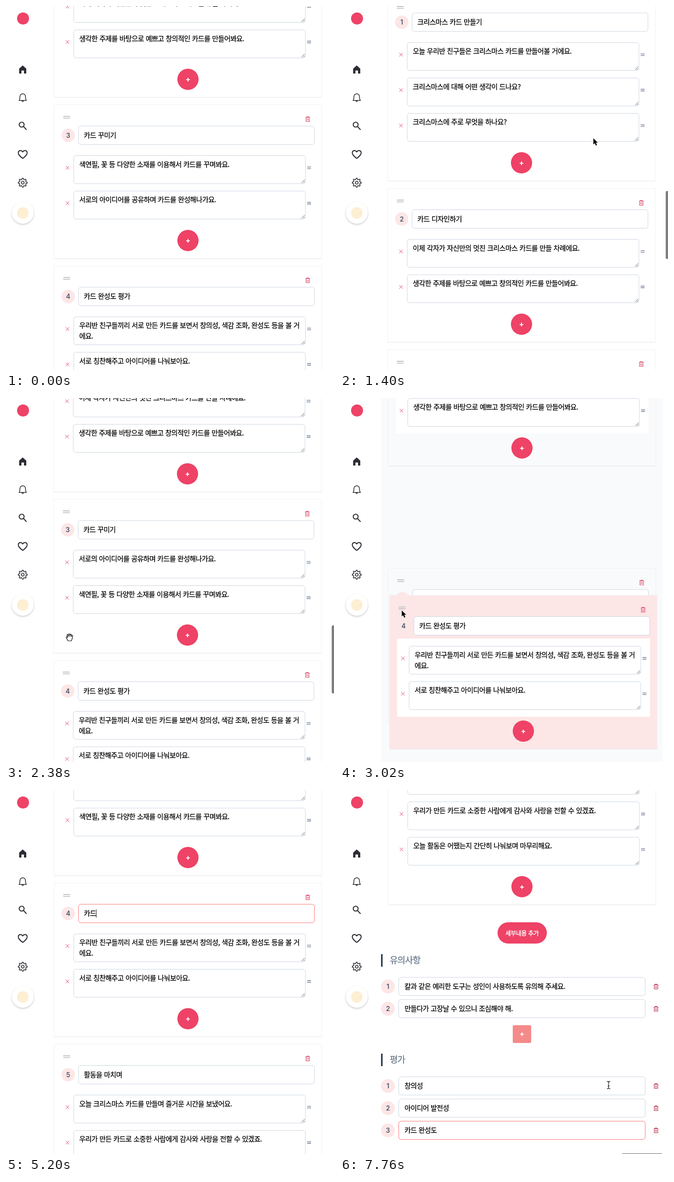
An HTML page for the animation above (7.84 s loop, 712 by 787 pixels).

```html
<!DOCTYPE html>
<html lang="ko">
<head>
<meta charset="utf-8">
<style>
html, body { margin: 0; width: 100%; height: 100%; overflow: hidden; background: #fff; }
svg { display: block; }
text { font: 400 15px "Noto Sans CJK KR", "Noto Sans CJK", sans-serif; letter-spacing: -.6px; word-spacing: .45px; color: #000; fill: currentColor; stroke: currentColor; stroke-width: .25px; white-space: pre; }
.num { font: 600 14px Inter, sans-serif; letter-spacing: 0; color: #475569; stroke: none; text-anchor: middle; }
.heading { font-size: 19px; letter-spacing: -.9px; color: #64748b; }
.add { font-size: 13px; letter-spacing: -.5px; color: #fff; stroke-width: .45px; }
.field { fill: #fff; stroke: #cbd5e1; }
.focus { stroke: #f87171; }
.icon { fill: none; stroke: #2b2d33; stroke-width: 1.6; stroke-linecap: round; stroke-linejoin: round; }
.bold { stroke-width: 2.1; }
</style>
</head>
<body>
<svg id="stage" width="712" height="787" viewBox="0 0 712 787"></svg>
<script>
const LOOP = 7840;
const STRIDE = 348.5;      // distance between two-item cards
const ITEM = 76.6;         // distance between items in a card
const START = 213;         // where the third card begins
const RED = '#ee4266', PINK = '#fde6e6';
const EVAL_TEXT = '카드 완성도', CARD_TEXT = '카드 완성도 평가';

const cards = [
  { title: '크리스마스 카드 만들기', items: [
    ['오늘 우리반 친구들은 크리스마스 카드를 만들어볼 거에요.'],
    ['크리스마스에 대해 어떤 생각이 드나요?'],
    ['크리스마스에 주로 무엇을 하나요?']] },
  { title: '카드 디자인하기', items: [
    ['이제 각자가 자신만의 멋진 크리스마스 카드를 만들 차례에요.'],
    ['생각한 주제를 바탕으로 예쁘고 창의적인 카드를 만들어봐요.']] },
  { title: '카드 꾸미기', items: [
    ['색연필, 꽃 등 다양한 소재를 이용해서 카드를 꾸며봐요.'],
    ['서로의 아이디어를 공유하며 카드를 완성해나가요.']] },
  { title: CARD_TEXT, items: [
    ['우리반 친구들끼리 서로 만든 카드를 보면서 창의성, 색감 조화, 완성도 등을 볼 거', '에요.'],
    ['서로 칭찬해주고 아이디어를 나눠보아요.']] },
  { title: '활동을 마치며', items: [
    ['오늘 크리스마스 카드를 만들며 즐거운 시간을 보냈어요.'],
    ['우리가 만든 카드로 소중한 사람에게 감사와 사랑을 전할 수 있겠죠.'],
    ['오늘 활동은 어땠는지 간단히 나눠보며 마무리해요.']] }
];

const rect = (x, y, w, h, attrs = '') => `<rect x="${x}" y="${y}" width="${w}" height="${h}" ${attrs}/>`;
const circle = (x, y, r, attrs) => `<circle cx="${x}" cy="${y}" r="${r}" ${attrs}/>`;
const path = (d, attrs = '') => `<path d="${d}" ${attrs}/>`;
const label = (x, y, str, attrs = '') => `<text x="${x}" y="${y}" ${attrs}>${str}</text>`;
const group = (x, y, body, attrs = '') => `<g transform="translate(${x} ${y})" ${attrs}>${body}</g>`;

const field = (x, y, w, h, attrs = '') => rect(x, y, w, h, `rx="5" class="field" ${attrs}`);
const badge = (x, y, r, n) => circle(x, y, r, `fill="${PINK}"`) + label(x, y + 5, n, 'class="num"');
const equals = (x, y, w, gap, color) =>
  path(`M${x} ${y}h${w}m0 ${gap}h${-w}`, `fill="none" stroke="${color}" stroke-width="1.6"`);
const trash = (x, y, color) => group(x, y,
  path('M-5 -3.7H5M-2 -3.7V-5.2H2V-3.7M-3.8 -3.5V5.2H3.8V-3.5M-1.3 -1.2V3M1.3 -1.2V3',
    `fill="none" stroke="${color}" stroke-width="1.2"`));
const plus = (x, y) => path(`M${x - 4} ${y}h8m-4 -4v8`, 'stroke="#fff" stroke-width="2"');

function itemSvg(lines, id, y) {
  return group(0, y,
    rect(121, -15, 549, ITEM, `class="back" fill="${PINK}" visibility="hidden"`) +
    field(147, .5, 503, 60.5) +
    lines.map((line, i) => label(159, 24.5 + 23 * i, line)).join('') +
    path('M641.5 59.5l7 -7m-3 7l3 -3', 'fill="none" stroke="#555"') +
    path('M129.8 23l7.4 7.6m0 -7.6l-7.4 7.6', 'fill="none" stroke="#e0365f"') +
    equals(653.7, 25, 8.4, 3.5, '#7c86a0'), `id="${id}"`);
}

// The first card has no trash button, so its header is shorter.
function cardSvg({ title, items }, index) {
  const shift = index ? 0 : -7;
  const extra = (items.length - 2) * ITEM + shift;
  const height = 333 + extra;
  return group(0, (index - 2) * STRIDE - (index ? 0 : 70),
    rect(104.5, .5, 581, height - .5, 'class="body" fill="none" stroke="#f0f1f4"') +
    path(`M104 ${height + .3}H686`, 'stroke="#e8eaed"') +
    equals(124.3, 25.6, 15, 3.9, '#b4b8c0') +
    (index ? trash(655, 31.5, '#e0506e') : '') +
    badge(135, 66.5 + shift, 14.5, index + 1) +
    field(157.5, 46.5 + shift, 512, 40, `id="title${index}box"`) +
    label(169, 71.5 + shift, title, `id="title${index}"`) +
    rect(121, 94 + shift, 549, 169 + extra - shift, 'fill="#fff"') +
    items.map((lines, i) => itemSvg(lines, `item${index}_${i}`, 110 + shift + i * ITEM)).join('') +
    circle(395, 294 + extra, 23, `fill="${RED}"`) + plus(395, 294.8 + extra),
    `id="card${index}"`);
}

const row = (y, n, str) =>
  badge(104, y + 20, 15, n) + field(127.5, y, 535, 39.5, `id="row${str}"`) +
  label(140, y + 24.5, str) + trash(686, y + 20, '#c23b58');
const section = (y, title, rows) =>
  rect(89, y, 3.6, 27, 'fill="#334155"') + label(108, y + 20, title, 'class="heading"') +
  rows.map((str, i) => row(y + 50 + 48 * i, i + 1, str)).join('');

const footer = group(0, 1106.5,
  rect(342, 38, 107, 46, `rx="23" fill="${RED}"`) + label(359, 66, '세부내용 추가', 'class="add"') +
  section(107, '유의사항', ['칼과 같은 예리한 도구는 성인이 사용하도록 유의해 주세요.', '만들다가 고장날 수 있으니 조심해야 해.']) +
  rect(375, 260.5, 40, 38.5, 'rx="3" fill="#f58a8a"') + plus(395, 280) +
  section(322, '평가', ['창의성', '아이디어 발전성', EVAL_TEXT]) +
  rect(610, 538, 91, 40, 'rx="4" fill="#5f5c68"'));

const gear = Array.from({ length: 48 }, (_, i) => {
  const a = i * Math.PI / 24, r = 8.4 + 1.3 * Math.tanh(3 * Math.cos(8 * a));
  return `${(r * Math.sin(a)).toFixed(2)} ${(r * Math.cos(a)).toFixed(2)}`;
}).join('L');

const sidebar =
  circle(37, 27, 13, `fill="${RED}"`) +
  path('M28.5 135.5L36.3 128.5L44 135.5V146H39V139.5H33.5V146H28.5Z', 'fill="#2b2d33"') +
  group(36.3, 198, path('M-8 6.2H8C6 4 6 2 6 -2.2A6 6 0 0 0 -6 -2.2C-6 2 -6 4 -8 6.2ZM-2.3 6.5A2.4 2.4 0 0 0 2.3 6.5', 'class="icon"')) +
  group(36, 259, circle(-2, -2.5, 5.3, 'class="icon bold"') + path('M2 1.5L8 8', 'class="icon bold"')) +
  group(36.3, 321, path('M0 8.5C-5 4.5 -9.6 1 -9.6 -3.6C-9.6 -9 -2.8 -10.3 0 -5.4C2.8 -10.3 9.6 -9 9.6 -3.6C9.6 1 5 4.5 0 8.5Z', 'class="icon bold"')) +
  group(36.3, 382, path(`M${gear}Z`, 'class="icon"') + circle(0, 0, 3, 'class="icon"')) +
  circle(36.5, 447, 23.5, 'fill="#fff" filter="url(#shade)"') + circle(36.5, 447.5, 12.5, 'fill="#fcefd2"');

const cursors = {
  arrow: path('M0 0V13.2L3 10.4L5.4 15.8L7.8 14.7L5.5 9.5H9.6Z', 'fill="#000" stroke="#fff" paint-order="stroke"'),
  hand: path('M-3.5 8L-7 1.6Q-7.8 -.6 -5.8 -.6L-4 1.2L-5.6 -4Q-5.6 -6 -3.8 -5.6L-2.3 -1.5L-2.5 -6Q-1.2 -8.4 .2 -6.2L.5 -1.5L1.4 -6Q3 -7.8 3.8 -5.4L3.3 -1L5 -3.6Q7 -4.4 6.8 -2L5.4 4L4 8Z',
    'fill="#fff" stroke="#000" stroke-width="1.2" stroke-linejoin="round"'),
  beam: path('M-3.5 -8Q-.5 -8 0 -6Q.5 -8 3.5 -8M0 -6V6M-3.5 8Q-.5 8 0 6Q.5 8 3.5 8M-2 1.8H2', 'fill="none" stroke="#222" stroke-width="1.3"')
};

// Card 4 is drawn last because it is dragged over the others.
const cardSvgs = cards.map(cardSvg);
cardSvgs.push(...cardSvgs.splice(3, 1));

const stage = document.getElementById('stage');
stage.innerHTML =
  '<defs><filter id="shade" x="-30%" y="-30%" width="160%" height="160%"><feDropShadow dx="0" dy="2" stdDeviation="2" flood-opacity=".22"/></filter></defs>' +
  rect(89, 0, 612, 787, 'id="dragBack" fill="#f8fafc"') +
  `<g id="page">${footer}${cardSvgs.join('')}</g>` +
  sidebar +
  rect(0, 0, 1, 18, 'id="caret"') +
  rect(707, 0, 8, 147, 'id="bar" rx="3" fill="#7f7f7f"') +
  Object.entries(cursors).map(([name, shape]) => `<g id="${name}">${shape}</g>`).join('');

const el = id => document.getElementById(id);
const move = (id, x, y) => el(id).setAttribute('transform', `translate(${x} ${y})`);
const show = (node, on) => node.setAttribute('visibility', on ? 'visible' : 'hidden');
const within = (t, from, to) => t >= from && t < to;

// Progress from 0 to 1 between two times: gentle at both ends, or slowing down.
const progress = (t, from, to) => Math.min(1, Math.max(0, (t - from) / (to - from)));
const glide = (t, from, to) => { const u = progress(t, from, to); return u * u * (3 - 2 * u); };
const settle = (t, from, to) => 1 - (1 - progress(t, from, to)) ** 3;

const textWidth = str => [...str].reduce((sum, c) => sum + (c === ' ' ? 4 : 13.2), 0);

const scrollAt = t => START
  + 529.5 * glide(t, 660, 1380) - 601.5 * glide(t, 1460, 1880)
  + 77.5 * glide(t, 2180, 2360) - 56 * glide(t, 2400, 2540)
  - 310.5 * glide(t, 3240, 3640) - 710.5 * settle(t, 6240, 7071);

const typedLength = t => Math.round(CARD_TEXT.length
  - 2 * progress(t, 4420, 4620) - 5 * progress(t, 4900, 5200) + 7 * progress(t, 5360, 6080));

function cursorAt(t, itemY, handleX, handleY) {
  let point = [684, 580];
  const go = (x, y, from, to) => {
    const u = glide(t, from, to);
    point = [point[0] + (x - point[0]) * u, point[1] + (y - point[1]) * u];
  };
  go(657, itemY, 20, 100);
  go(550, 286, 640, 1380);
  go(138, 517, 1460, 1880);
  go(handleX, handleY, 2400, 2540);
  go(234, 379, 3240, 3640);
  go(300, 268, 3780, 3900);
  go(276, 398, 5200, 6200);
  go(583, 735, 7080, 7300);
  go(583, 638, 7400, 7600);
  return point;
}

function cursorKind(t) {
  if (t < 20 || within(t, 4420, 6240)) return '';
  if (within(t, 1890, 2420)) return 'hand';
  return t >= 3860 && !within(t, 7080, 7200) ? 'beam' : 'arrow';
}

function draw(t) {
  const scroll = scrollAt(t);
  move('page', within(t, 660, 2420) ? -1 : 0, scroll);

  // swapping two items
  const lifted = ITEM * (1 - glide(t, 240, 600));
  move('item2_0', 0, 110 + ITEM * glide(t, 380, 520));
  move('item2_1', 0, 110 + lifted);
  show(el('item2_1').querySelector('.back'), within(t, 240, 620));

  // dragging a whole card
  const cardDrag = within(t, 2560, 3200);
  const dx = 3 * (glide(t, 2560, 2640) - glide(t, 3080, 3200));
  const dy = -230 * (glide(t, 2560, 2880) - settle(t, 2980, 3125));
  move('card3', dx, STRIDE + dy);
  move('card2', 0, STRIDE * (glide(t, 2680, 2860) - settle(t, 2980, 3233)));
  show(el('dragBack'), cardDrag);
  el('card3').querySelector('.body').setAttribute('fill', cardDrag ? PINK : 'none');

  // editing fields
  const typed = CARD_TEXT.slice(0, typedLength(t));
  const titleFocus = within(t, 3900, 7320), evalFocus = t >= 7320;
  el('title3').textContent = typed;
  el('title3box').classList.toggle('focus', titleFocus);
  el('row' + EVAL_TEXT).classList.toggle('focus', evalFocus);
  const blink = within(t, 4100, 4260) || within(t, 4760, 4900) || t >= 7760;
  show(el('caret'), (titleFocus || evalFocus) && !blink);
  el('caret').setAttribute('x', evalFocus ? 140 + textWidth(EVAL_TEXT) : 169 + textWidth(typed));
  el('caret').setAttribute('y', scroll + (evalFocus ? 1584.5 : STRIDE + 57.5));

  // the scrollbar appears only while the page moves
  show(el('bar'), Math.abs(scroll - scrollAt(t - 30)) > .01);
  el('bar').setAttribute('y', 400 + (742.5 - scroll) * .175);

  const kind = cursorKind(t);
  const point = cursorAt(t, START + 137 + lifted, 131 + dx, scroll + STRIDE + dy + 33);
  for (const name in cursors) {
    show(el(name), name === kind);
    move(name, ...point);
  }
}

const start = performance.now();
function tick() {
  draw((performance.now() - start) % LOOP);
  requestAnimationFrame(tick);
}
draw(0);
requestAnimationFrame(tick);
</script>
</body>
</html>
```
